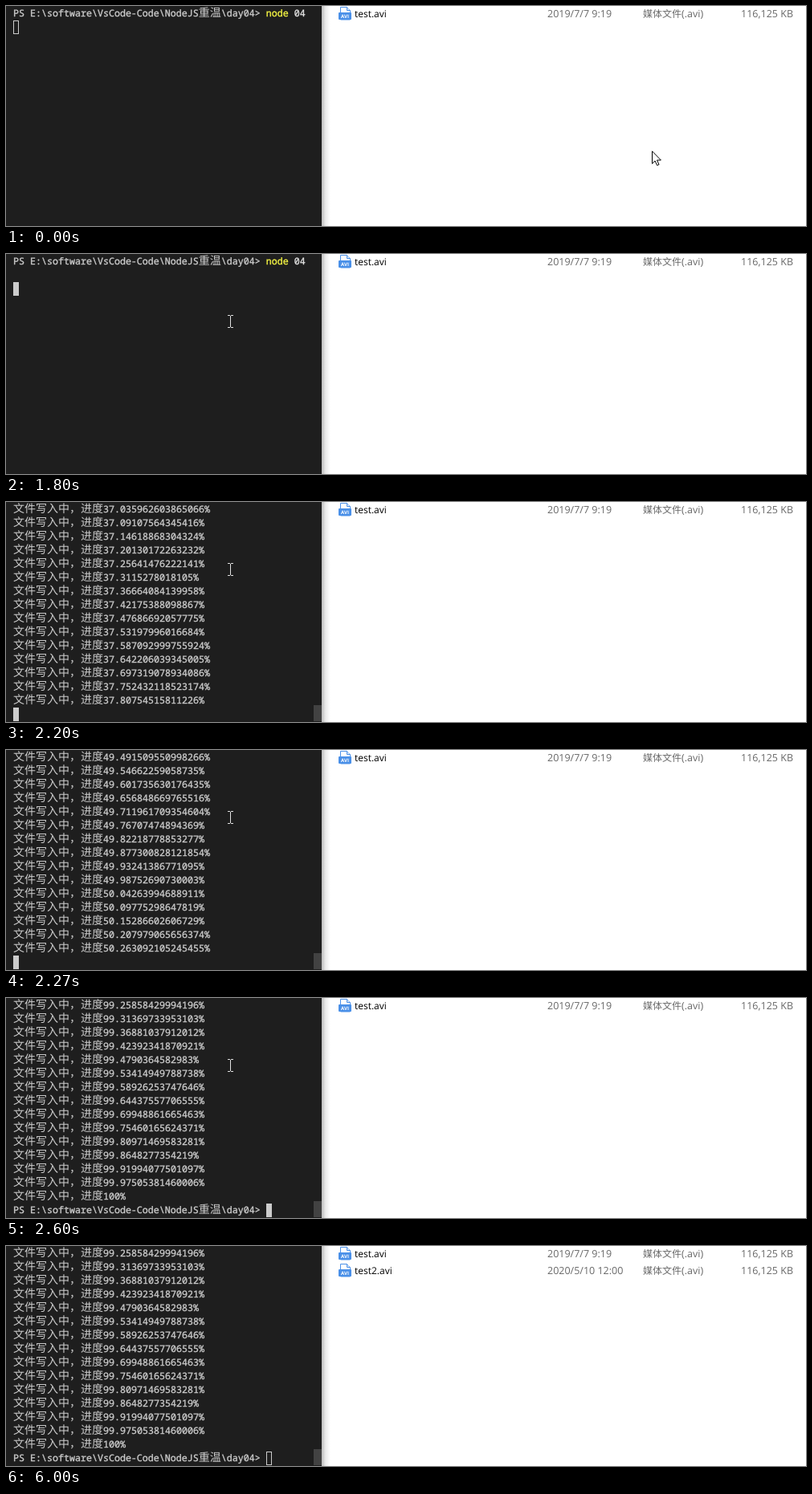
Animation of 996 by 274 pixels, one loop 6140 ms. Source, as an HTML page:

```html
<!DOCTYPE html>
<html lang="zh">
<head>
<meta charset="utf-8">
<title>File copy progress</title>
<style>
  html, body { margin: 0; width: 100%; height: 100%; overflow: hidden; background: #fff; }
  svg { display: block; width: 996px; height: 274px; }
  text { white-space: pre; text-rendering: geometricPrecision; }
  #rows text { font: 11.667px "Noto Sans Mono", "DejaVu Sans Mono", monospace; }
  #rows text, #rows tspan { fill: currentColor; stroke: currentColor; stroke-width: .35px; }
  #rows { color: #ccc; }
  #rows .han { font: 14px "Noto Sans CJK SC", "Noto Sans CJK JP", sans-serif; stroke: none; }
  .cmd { color: #f5f543; }
  .arg { color: #e5e5e5; }
  #rows .under { color: #1e1e1e; stroke: none; }
  .file { font: 12.5px "Open Sans", "Noto Sans", sans-serif; fill: #686868; }
  .file .name { font-size: 12px; fill: #000; }
  .file .han { font: 12px "Noto Sans CJK SC", "Noto Sans CJK JP", sans-serif; }
  .tag { font: bold 6px "Open Sans", sans-serif; fill: #fff; }
  .crisp { shape-rendering: crispEdges; }
</style>
</head>
<body>
<svg viewBox="0 0 996 274">
  <defs>
    <linearGradient id="shade">
      <stop offset="0" stop-color="#000" stop-opacity=".26"/>
      <stop offset=".45" stop-color="#000" stop-opacity=".08"/>
      <stop offset="1" stop-color="#000" stop-opacity="0"/>
    </linearGradient>
    <g id="icon">
      <path d="M416.5 1.5h8l4 4v11.5h-12z" fill="#fff" stroke="#4a90e8"/>
      <path d="M424.5 1.5v4h4" fill="#dce9fa" stroke="#4a90e8"/>
      <rect x="414" y="8" width="16" height="9" rx="1" fill="#4a90e8"/>
      <text class="tag" x="422" y="14.7" text-anchor="middle">AVI</text>
    </g>
  </defs>

  <rect width="996" height="274" fill="#fff"/>
  <rect x="393" width="11" height="274" fill="url(#shade)"/>
  <g id="files"></g>

  <rect class="crisp" width="393" height="274" fill="#1e1e1e"/>
  <rect id="bar" class="crisp" x="383" width="10" fill="#424242"/>
  <rect id="caret" x="9.5" width="6" height="16" stroke="#ccc"/>
  <g id="rows"></g>

  <path id="arrow" d="M.5 .8v15.6l3.6-3.5 2.5 5.6 2.4-1-2.5-5.5h4.9z" fill="#fff" stroke="#000"/>
  <path id="beam" class="crisp" d="M0 .5h3m1 0h3M3.5 1v14M0 15.5h3m1 0h3" fill="none" stroke="#e1e1e1"/>
</svg>

<script>
const LOOP = 6140, ROWS = 16, PITCH = 17, EDGE = 393;
const SIZE = 118911968, CHUNK = 65536;
const LINES = Math.ceil(SIZE / CHUNK);
const $ = id => document.getElementById(id);

// time -> chunks written so far
const written = [
  [1930, 9], [2000, 84], [2070, 236], [2130, 461], [2200, 686], [2270, 912],
  [2330, 1138], [2400, 1363], [2470, 1588], [2530, 1808], [2600, LINES]
];

// pointer glides, drawn in n even hops
const glides = [
  { start: 70, end: 200, n: 3, from: [804, 180], to: [407, 112] },
  { start: 470, end: 600, n: 3, from: [407, 112], to: [276, 76] },
  { start: 2870, end: 3470, n: 10, from: [276, 76], to: [51, 276] }
];

const han = s => `<tspan class="han">${s}</tspan>`;
const path = `PS E:\\software\\VsCode-Code\\NodeJS${han("重温")}\\day04&gt; `;
const command = `${path}<tspan class="cmd">node</tspan> <tspan class="arg">04</tspan>`;
const percent = k => Math.min(k * CHUNK, SIZE) / SIZE * 100;
const label = "文件写入中，进度";

function line(i, count, done) {
  if (i === 0) return command;
  const k = i - 1;
  if (k >= 1 && k <= count) return han(label) + percent(k) + "%";
  return done && k === count + 1 ? path : "";
}

function fileRow(id, y, name, date) {
  return `<g id="${id}" class="file" transform="translate(0 ${y})">
    <use href="#icon"/>
    <text class="name" x="434" y="14">${name}</text>
    <text x="674" y="14">${date}</text>
    <text x="793" y="14">${han("媒体文件")}(.avi)</text>
    <text x="980" y="14" text-anchor="end">116,125 KB</text></g>`;
}
$("files").innerHTML = fileRow("first", 0, "test.avi", "2019/7/7 9:19") +
  fileRow("second", 21, "test2.avi", "2020/5/10 12:00");
$("rows").innerHTML = Array.from({ length: ROWS }, (_, r) =>
  `<text x="9" y="${r * PITCH + 13}"></text>`).join("");
const rows = [...$("rows").children];

function drawTerminal(t) {
  const step = written.filter(w => w[0] <= t).pop();
  const count = step ? step[1] : 0;
  const done = count === LINES;
  const onText = count === 236;      // caught before the line feed
  const last = t < 1800 ? 1 : count + (onText ? 1 : 2);
  const top = Math.max(0, last - ROWS + 1);

  rows.forEach((row, r) => {
    const i = top + r;
    let html = i <= last ? line(i, count, done) : "";
    if (onText && i === last) html = html.replace("文", '<tspan class="under">文</tspan>');
    if (row.shown !== html) row.innerHTML = row.shown = html;
  });

  const caret = $("caret");
  caret.setAttribute("x", done ? 324.5 : 9.5);
  caret.setAttribute("y", (last - top) * PITCH + 1.5);
  caret.setAttribute("width", onText ? 13 : 6);
  caret.setAttribute("fill", t >= 930 && t < 6000 ? "#ccc" : "none");

  const height = top ? Math.max(20, Math.round(7440 / (last + 1))) : 0;
  $("bar").setAttribute("y", 273 - height);
  $("bar").setAttribute("height", height);
}

function drawPointer(t) {
  let [x, y] = glides[0].from;
  for (const g of glides) {
    if (t < g.start) break;
    const gap = (g.end - g.start) / (g.n - 1);
    const p = Math.min(1, (Math.floor((t - g.start) / gap + 0.001) + 1) / g.n);
    [x, y] = g.from.map((a, i) => Math.round(a + (g.to[i] - a) * p));
  }
  const inside = x < EDGE;
  for (const [id, on] of [["arrow", !inside], ["beam", inside]]) {
    $(id).setAttribute("transform", `translate(${x} ${y})`);
    $(id).setAttribute("visibility", on ? "visible" : "hidden");
  }
}

function draw() {
  const t = performance.now() % LOOP;
  drawTerminal(t);
  drawPointer(t);
  $("second").setAttribute("visibility", t >= 3200 ? "visible" : "hidden");
  requestAnimationFrame(draw);
}
draw();
</script>
</body>
</html>
```
